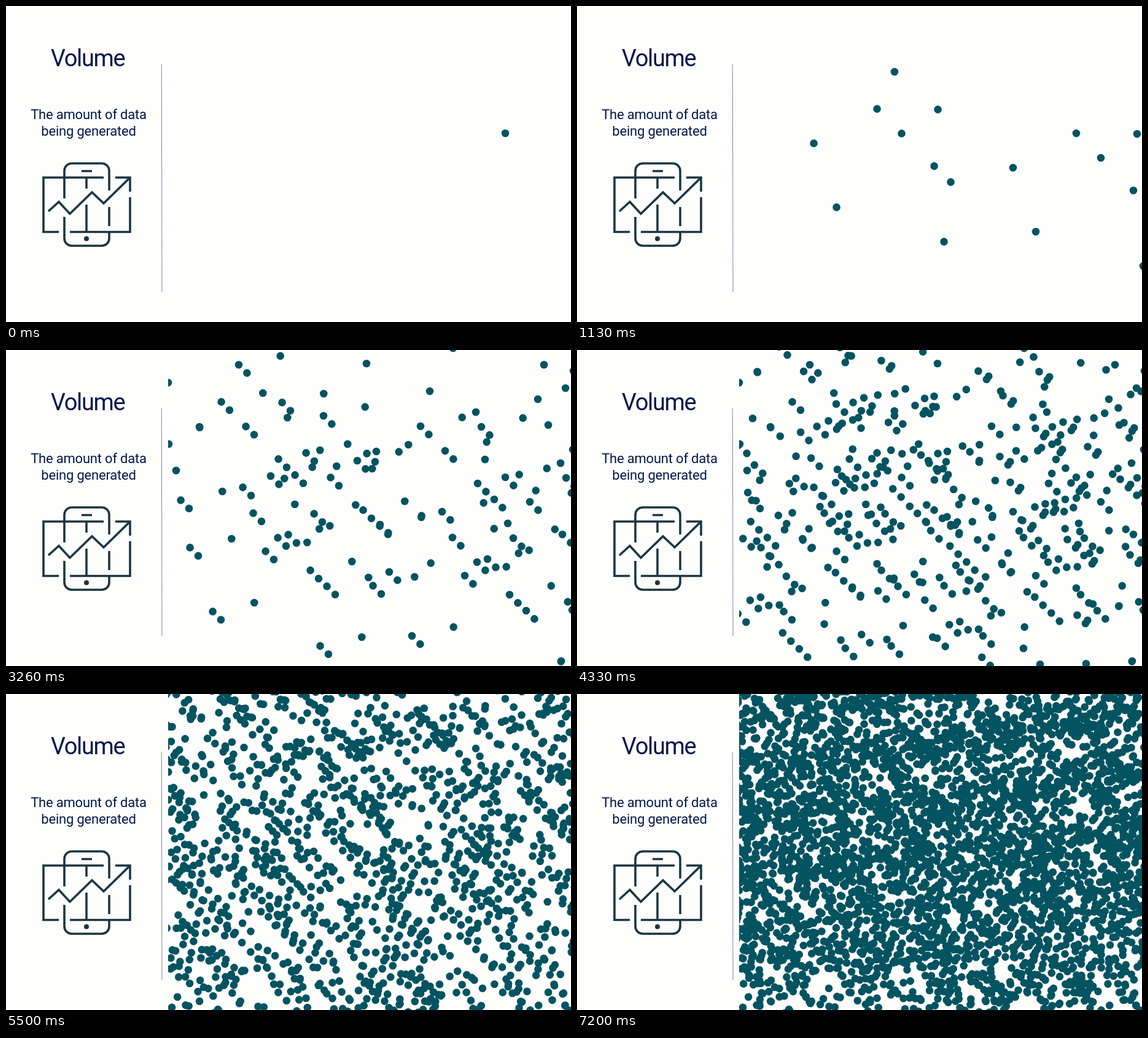
An HTML page with a canvas that plays this animation: 920 by 514 pixels, repeating every 8000 ms.

```html
<!DOCTYPE html>
<html lang="en">
<head>
<meta charset="utf-8">
<title>Volume</title>
<style>
  html, body { margin: 0; width: 100%; height: 100%; overflow: hidden; background: #fefefd; }
  svg, canvas { position: absolute; left: 0; top: 0; }
  text { font-family: Roboto, "Open Sans", sans-serif; fill: #04184a; text-anchor: middle; }
  .title { font-size: 38px; letter-spacing: -1.4px; }
  .note { font-size: 22px; letter-spacing: -.2px; }
  .icon { fill: none; stroke: #1a3640; stroke-width: 3.6; }
</style>
</head>
<body>
<svg width="920" height="514" viewBox="0 0 920 514">
  <text class="title" x="133" y="97.500">Volume</text>
  <text class="note" x="134.500" y="184">The amount of data</text>
  <text class="note" x="134.500" y="211">being generated</text>
  <path d="M253.300 95L254 465" stroke="#7d879c"/>
  <g class="icon">
    <path d="M95 313V268a12 12 0 0 1 12-12H156a12 12 0 0 1 12 12V300M168 327V358M168 367V378a12 12 0 0 1-12 12H107a12 12 0 0 1-12-12V343"/>
    <path d="M159 279H61V367.500H86M104 367.500H202V311M178 279H202V302M131 279V297M131 323V367M123 268.500H140"/>
    <path d="M69 334L86 318.500L104 338L140 303L159 321L202 279"/>
  </g>
  <circle cx="131" cy="378.500" r="4" fill="#1a3640"/>
</svg>
<canvas id="dots" width="920" height="514"></canvas>
<script>
const LEFT = 264, W = 920, H = 514, R = 6.3, LOOP = 8000;
const ctx = document.getElementById('dots').getContext('2d');

const move = (dots, [dx, dy]) => dots.map(([x, y]) => [x + dx, y + dy]);
// The cloud grows by stamping shifted copies of itself.
const grow = (dots, ...shifts) => [dots, ...shifts.map(s => move(dots, s))].flat();
const visible = dots => dots.filter(([x, y]) => x > LEFT - R && x < W + R && y > -R && y < H + R);
const wrap = (v, from, to) => from + ((v - from) % (to - from) + to - from) % (to - from);
const wrapX = dots => dots.map(([x, y]) => [wrap(x, LEFT - R, W + R), y]);
const wrapY = dots => dots.map(([x, y]) => [x, wrap(y, -R, H + R)]);

const seed = [[813, 207]];
const few = [...seed, [853, 247], [906, 300], [912, 208], [922, 423], [933, 326],
  [710, 263], [747, 367], [517, 107]];
const spread = [[-138, -83], [-86, 98]];
const strays = [[876, 24], [690, 67], [603, 165], [904, 506], [315, 125],
  [264, 53], [265, 153], [277, 196], [911, 62]];

const pair = grow(few, [-324.4, -39.6]);
const some = grow(pair, ...spread);
const many = [...grow(some, [13.4, 13.4], [67.7, -14.4]),
  ...grow(move(few, [156, -183]), ...spread), ...strays];
const crowd = grow(many, [-160.7, 101.7], [-21.5, -89.7]);
const settled = move(crowd, [.7, .3]);
const base = visible(move(crowd, [6.5, .3]));
const swarm = wrapY(wrapX(grow(base, [-150, 165], [118, -130])));
const flood = wrapX(grow(swarm, [-95, -75], [131, -14]));

const steps = [[0, seed], [60, few], [1130, pair], [2200, some], [3260, many],
  [4330, crowd], [4360, settled], [5500, swarm], [7200, flood]];

ctx.beginPath();
ctx.rect(LEFT, 0, W - LEFT, H);
ctx.clip();
ctx.fillStyle = '#035361';

function draw(dots) {
  ctx.clearRect(0, 0, W, H);
  ctx.beginPath();
  for (const [x, y] of visible(dots)) {
    ctx.moveTo(x + R, y);
    ctx.arc(x, y, R, 0, 7);
  }
  ctx.fill();
}

let shown;
function tick() {
  const t = performance.now() % LOOP;
  const dots = steps.findLast(([start]) => t >= start)[1];
  if (dots !== shown) draw(shown = dots);
  requestAnimationFrame(tick);
}
tick();
</script>
</body>
</html>
```
